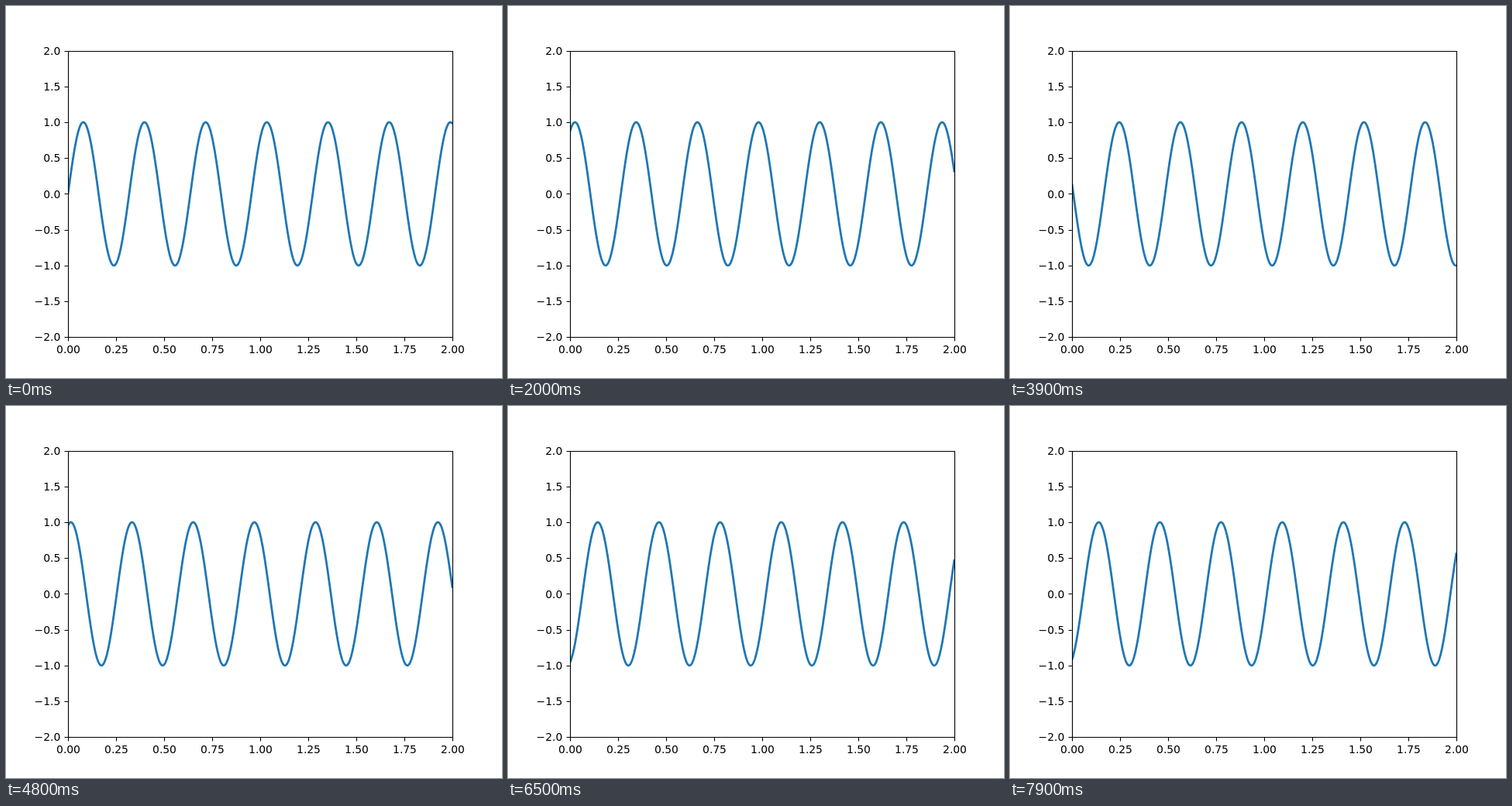
Recreate the animation shown at these times as an HTML page with a canvas. Size 640 by 480 pixels, loop 8 s.

```html
<!DOCTYPE html>
<html lang="en">
<head>
<meta charset="utf-8">
<title>Travelling sine wave</title>
<style>
  html, body { margin: 0; width: 100%; height: 100%; overflow: hidden; background: #fff; }
  canvas { display: block; }
</style>
</head>
<body>
<canvas id="plot" width="640" height="480"></canvas>
<script>
const ctx = document.getElementById('plot').getContext('2d');
const LEFT = 80, RIGHT = 576, TOP = 57.6, BOTTOM = 427.2;
const STEP = 100, LOOP = 8000, POINTS = 1000;

const toX = x => LEFT + x / 2 * (RIGHT - LEFT);
const toY = y => BOTTOM - (y + 2) / 4 * (BOTTOM - TOP);
const snap = v => Math.round(v) + 0.5;

function drawWave(n) {
  ctx.save();
  ctx.beginPath();
  ctx.rect(LEFT, TOP, RIGHT - LEFT, BOTTOM - TOP);
  ctx.clip();
  ctx.beginPath();
  for (let i = 0; i < POINTS; i++) {
    const x = 2 * i / (POINTS - 1);
    ctx.lineTo(toX(x), toY(Math.sin(2 * Math.PI ** 2 * (x - n))));
  }
  ctx.strokeStyle = '#1f77b4';
  ctx.lineWidth = 2.78;
  ctx.lineJoin = 'round';
  ctx.stroke();
  ctx.restore();
}

function drawAxes() {
  const left = snap(LEFT), bottom = snap(BOTTOM);
  ctx.strokeStyle = ctx.fillStyle = '#000';
  ctx.lineWidth = 1.11;
  ctx.font = '13.89px "DejaVu Sans", sans-serif';
  ctx.beginPath();
  ctx.rect(left, snap(TOP), snap(RIGHT) - left, bottom - snap(TOP));
  for (let i = 0; i <= 8; i++) {
    const xv = i / 4, yv = i / 2 - 2;
    const x = toX(xv), y = toY(yv);
    ctx.moveTo(snap(x), bottom);
    ctx.lineTo(snap(x), bottom + 5);
    ctx.moveTo(left, snap(y));
    ctx.lineTo(left - 5, snap(y));
    ctx.textAlign = 'center';
    ctx.fillText(xv.toFixed(2), x + 0.5, 448);
    ctx.textAlign = 'right';
    ctx.fillText(yv.toFixed(1).replace('-', '\u2212'), 70.3, Math.round(y + 5.2));
  }
  ctx.stroke();
}

function frame() {
  const n = Math.floor(performance.now() % LOOP / STEP);
  ctx.clearRect(0, 0, 640, 480);
  drawWave(n);
  drawAxes();
  requestAnimationFrame(frame);
}
frame();
</script>
</body>
</html>
```
